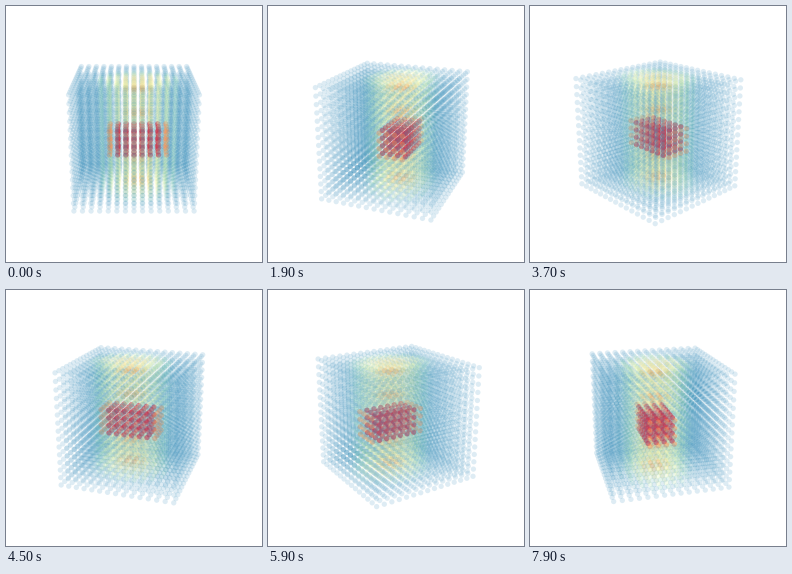
Recreate the animation shown at these times as a matplotlib script. Size 256 by 256 pixels, loop 8000 ms.

```python
import numpy as np
import matplotlib.pyplot as plt
from matplotlib.animation import FuncAnimation

SIZE, DPI = 256, 100
FRAMES, STEP = 80, 3.6
N = 15
DOT = 5.3
ELEV = np.radians(20)
DIST, FOCAL = 9.0, 505

axis = np.linspace(-1, 1, N)
X, Y, Z = (a.ravel() for a in np.meshgrid(axis, axis, axis, indexing="ij"))


def field():
    """Hot bar with glowing ends inside a warm, rippled column."""
    half = (N - 1) / 2
    x, y, z = X * half - 0.5, Y * half - 0.5, Z * half + 0.5
    column = np.exp(-((x / 4.0) ** 2 + (y / 3.5) ** 2) ** 2)
    core = np.exp(-(x / 1.7) ** 2 - (y / 1.7) ** 2)
    ripple = np.cos(2 * np.pi * Z * half / 3)
    value = 0.11 + 0.47 * column + core * (0.05 + 0.11 * ripple)
    bar = (abs(y) < 2) & (abs(z) < 2)
    value[bar & (abs(x) < 4)] = 0.74
    value[bar & (abs(x) < 3)] = 0.91
    return value


value = field()
colors = plt.cm.Spectral_r(value)
colors[:, 3] = 0.16 + 0.65 * value ** 2.5


def project(deg):
    t = np.radians(deg)
    side = X * np.cos(t) + Y * np.sin(t)
    front = Y * np.cos(t) - X * np.sin(t)
    up = Z * np.cos(ELEV) - front * np.sin(ELEV)
    depth = DIST - front * np.cos(ELEV) - Z * np.sin(ELEV)
    k = FOCAL / depth
    return SIZE / 2 + side * k, SIZE / 2 + up * k, depth


fig = plt.figure(figsize=(SIZE / DPI, SIZE / DPI), dpi=DPI, facecolor="white")
ax = fig.add_axes([0, 0, 1, 1])
ax.set(xlim=(0, SIZE), ylim=(0, SIZE))
ax.axis("off")
dots = ax.scatter(X, Y, s=(DOT * 72 / DPI) ** 2, linewidths=0)


def update(i):
    px, py, depth = project(i * STEP)
    order = np.argsort(-depth)
    dots.set_offsets(np.column_stack([px, py])[order])
    dots.set_facecolors(colors[order])
    return (dots,)


anim = FuncAnimation(fig, update, frames=FRAMES, interval=100, repeat=True,
                     repeat_delay=0, blit=False)
plt.show()
```
